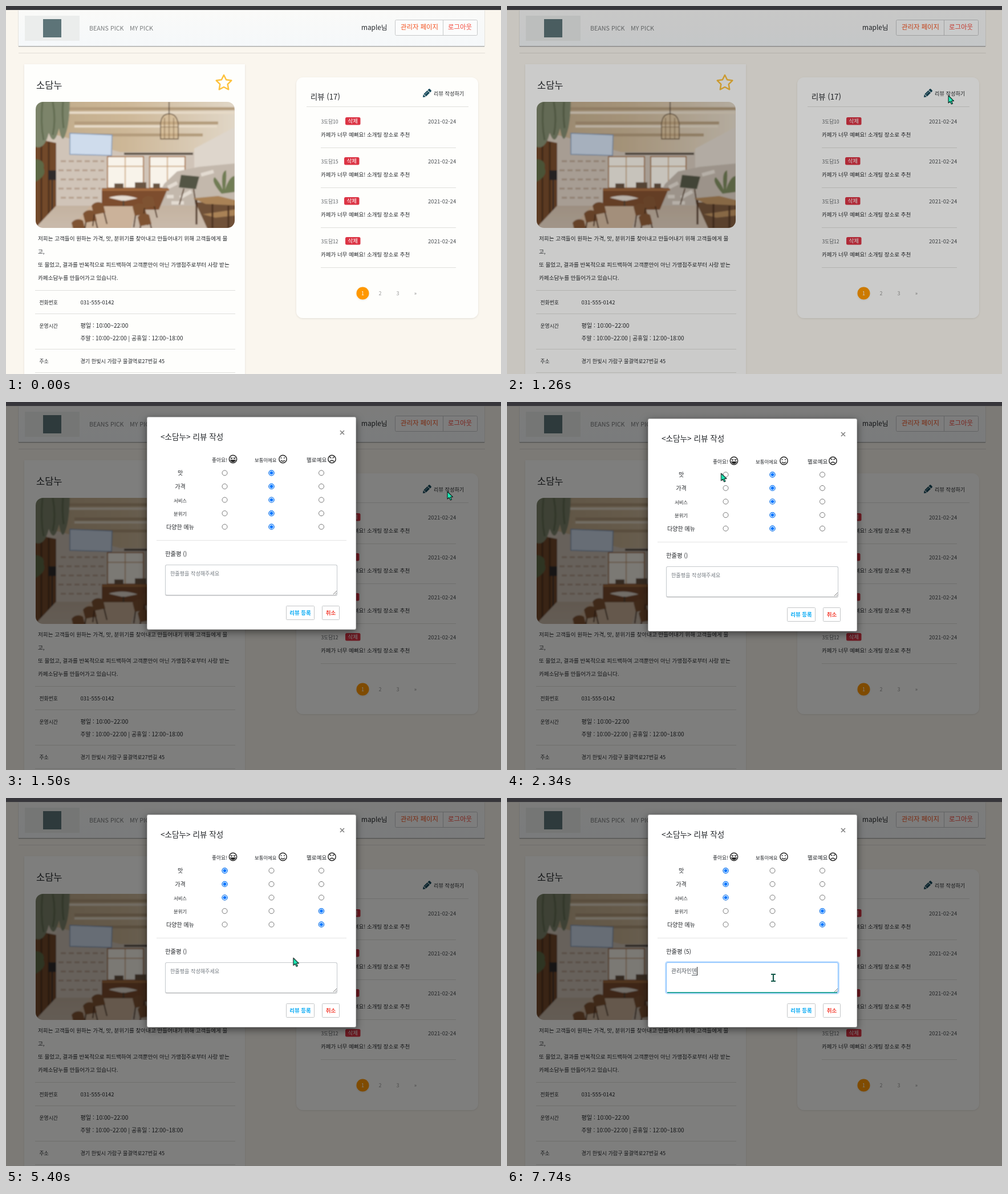
An HTML page that plays this animation: 868x645 px, repeating every 8000 ms.

```html
<!DOCTYPE html>
<html lang="ko">
<head>
<meta charset="utf-8">
<title>리뷰 작성</title>
<style>
html, body { margin: 0; width: 100%; height: 100%; overflow: hidden; background: #faf6ee; }
body { font-family: "Noto Sans CJK KR", "Noto Sans KR", "Noto Sans CJK", "Noto Sans", sans-serif; }
.stage { position: relative; width: 868px; height: 645px; overflow: hidden; }
.stage svg { position: absolute; left: 0; top: 0; display: block; }
.clip { position: absolute; left: 0; top: 7px; width: 868px; height: 638px; overflow: hidden; }
.shade { position: absolute; inset: 0; background: #000; animation: shade 8s linear infinite; }
.modal { position: absolute; left: 0; top: -7px; width: 868px; height: 645px; animation: drop 8s linear infinite; }
.panel { position: absolute; left: 247px; top: 29px; width: 365px; height: 371px; background: #fff;
  border: 1px solid rgba(0,0,0,.2); border-radius: 3px; box-shadow: 0 4px 14px rgba(0,0,0,.5); }
text { fill: #23262a; }
.mid { text-anchor: middle; }
.rule { stroke: #dfdfdc; }
.field { position: absolute; left: 279px; top: 288px; width: 300px; height: 52px; background: #fff;
  border: 1px solid #c6cace; border-bottom-color: #aeb2b5; border-radius: 3px;
  box-shadow: 0 1px 1px rgba(0,0,0,.12); animation: focus 8s linear infinite; }
.field i { position: absolute; left: 1px; right: 1px; bottom: -1px; height: 2px; background: #26a69a; }
.field i, .caret { animation: after-focus 8s step-end infinite; }
.line { position: absolute; white-space: pre; line-height: 16px; color: #23262a; }
.count { left: 279px; top: 260.5px; font-size: 10.3px; }
.typed { left: 288px; top: 295px; font-size: 9.7px; color: #495057; display: flex; }
.line b { font-weight: 400; }
.line b::before { content: ""; animation: 8s step-end infinite; }
.line .num::before { animation-name: num; }
.line .done::before { animation-name: done; }
.line .comp::before { animation-name: comp; }
.comp { height: 15px; border-bottom: 1px solid transparent; animation: under 8s step-end infinite; }
.caret { width: 1px; height: 15px; margin-top: 1px; background: #222; }
.hint { animation: hint 8s step-end infinite; }
.pick { animation: 8s step-end infinite; }
.cursor { animation: move 8s linear infinite; }
.arrow { animation: arrow 8s step-end infinite; }
.beam { animation: beam 8s step-end infinite; }

@keyframes shade { 0%, 15% { opacity: 0 } 16.9%, to { opacity: .5 } }
@keyframes drop {
  0%, 16.5% { opacity: 0; transform: translateY(-44px) }
  17.25% { opacity: .18; transform: translateY(-30px) }
  18% { opacity: .6; transform: translateY(-12px) }
  18.75% { opacity: 1; transform: translateY(-3px) }
  19.5%, to { opacity: 1; transform: none }
}
@keyframes focus {
  0%, 70.5% { border-color: #c6cace #c6cace #aeb2b5; box-shadow: 0 1px 1px rgba(0,0,0,.12) }
  72%, to { border-color: #80bdff; box-shadow: 0 0 0 2px rgba(0,123,255,.25) }
}
@keyframes after-focus { 0% { opacity: 0 } 71.25%, to { opacity: 1 } }
@keyframes hint { 0% { opacity: 1 } 72%, to { opacity: 0 } }
@keyframes under { 0% { border-color: transparent } 72%, to { border-color: #495057 } }
@keyframes num {
  0% { content: "" } 72% { content: "1" } 81% { content: "2" }
  84% { content: "3" } 87.75% { content: "4" } 90.75%, to { content: "5" }
}
@keyframes done {
  0% { content: "" } 81% { content: "관" } 84% { content: "관리" }
  87.75% { content: "관리자" } 90.75%, to { content: "관리자인" }
}
@keyframes comp {
  0% { content: "" } 72% { content: "ㄱ" } 77.25% { content: "과" } 79.5% { content: "관" }
  81% { content: "ㄹ" } 81.75% { content: "리" } 84% { content: "ㅈ" } 85.5% { content: "자" }
  87.75% { content: "ㅇ" } 89.25% { content: "이" } 90% { content: "인" }
  90.75% { content: "ㄷ" } 91.5% { content: "데" } 96.75%, to { content: "덴" }
}
@keyframes pick0 { 0% { transform: none } 31.5%, to { transform: translateX(-82px) } }
@keyframes pick1 { 0% { transform: none } 36%, to { transform: translateX(-82px) } }
@keyframes pick2 { 0% { transform: none } 40.5%, to { transform: translateX(-82px) } }
@keyframes pick3 { 0% { transform: none } 56.25%, to { transform: translateX(87.5px) } }
@keyframes pick4 { 0% { transform: none } 60.75%, to { transform: translateX(87.5px) } }
@keyframes move {
  0%, 1.5% { transform: translate(630px,424px) }
  6% { transform: translate(845px,66px) }
  10.5%, 20% { transform: translate(774px,157px) }
  24.75% { transform: translate(444px,184px) }
  28.5%, 30.75% { transform: translate(375.5px,125px) }
  31.5%, 33% { transform: translate(379px,125px) }
  35.25%, 37% { transform: translate(380px,149px) }
  39.5%, 42% { transform: translate(381px,168px) }
  51.75% { transform: translate(541px,203px) }
  52.5% { transform: translate(552px,215px) }
  55%, 57% { transform: translate(553px,197px) }
  59.5%, 62.25% { transform: translate(553px,218px) }
  69% { transform: translate(490px,298px) }
  71.5%, to { transform: translate(467px,315px) }
}
@keyframes arrow { 0% { opacity: 0 } 1.5% { opacity: 1 } 69%, to { opacity: 0 } }
@keyframes beam { 0% { opacity: 0 } 69%, to { opacity: 1 } }
</style>
</head>
<body>
<div class="stage">
<svg width="868" height="645" viewBox="0 0 868 645">
  <defs>
    <clipPath id="photo"><rect x="52" y="168" width="349" height="221" rx="13"/></clipPath>
    <linearGradient id="ceiling">
      <stop stop-color="#bda888"/><stop offset=".45" stop-color="#cdb797"/><stop offset="1" stop-color="#e2d8c9"/>
    </linearGradient>
    <linearGradient id="floor" x2="0" y2="1">
      <stop stop-color="#c4b3a1"/><stop offset="1" stop-color="#cbbcae"/>
    </linearGradient>
    <linearGradient id="nav" x2="0" y2="1">
      <stop stop-color="#fafaf8"/><stop offset="1" stop-color="#f5f8fa"/>
    </linearGradient>
    <filter id="soft" x="-10%" y="-10%" width="120%" height="130%">
      <feDropShadow dx="0" dy="1" stdDeviation="1.5" flood-opacity=".1"/>
    </filter>
    <filter id="lens"><feGaussianBlur stdDeviation=".8"/></filter>
    <g id="chair">
      <path d="M0 6Q8-4 20 2L24 18L4 22Z" fill="#7f5231"/>
      <path d="M5 21L2 42M22 18L27 38" stroke="#4d3322" stroke-width="2"/>
    </g>
  </defs>
  <rect width="868" height="645" fill="#faf6ee"/>
  <rect width="868" height="7" fill="#37363b"/>

  <path d="M22 7H839V70H22Z" fill="url(#nav)"/>
  <path d="M22 70.500H839" stroke="#adafaf"/>
  <path d="M22 71.500H839" stroke="#d3d1cc"/>
  <path d="M21.500 8V71M839.500 8V71" stroke="#e6e3dd"/>
  <path d="M22 82.500H840" stroke="#e2ded7"/>
  <rect x="33" y="17" width="96" height="44" fill="#ebedec"/>
  <rect x="65" y="23" width="32" height="32" fill="#5d7478"/>
  <g font-size="10.700">
    <text x="146" y="42.500" style="fill:#777a7b">BEANS PICK</text>
    <text x="217" y="42.500" style="fill:#777a7b">MY PICK</text>
  </g>
  <text x="623" y="42" font-size="11.800">maple님</text>
  <rect x="682.500" y="24.500" width="144" height="27" rx="2" fill="#fbfcfc" stroke="#c6c8c9"/>
  <path d="M766.500 24V52" stroke="#c6c8c9"/>
  <g font-size="11.400" font-weight="500">
    <text x="692" y="41" style="fill:#f4511e">관리자 페이지</text>
    <text x="775" y="41" style="fill:#f44336">로그아웃</text>
  </g>

  <rect x="32" y="102" width="387" height="560" fill="#fefefc" filter="url(#soft)"/>
  <text x="53" y="145" font-size="16.500">소담누</text>
  <path d="M382 121L386.100 129.300L395.300 130.600L388.700 137.100L390.200 146.300L382 142L373.800 146.300L375.300 137.100L368.700 130.600L377.900 129.300Z"
    fill="none" stroke="#fdc23e" stroke-width="2.500" stroke-linejoin="round"/>

  <g clip-path="url(#photo)"><g filter="url(#lens)">
    <rect x="40" y="156" width="373" height="245" fill="#d2c6b8"/>
    <path d="M40 156H413V206L330 258H200L40 214Z" fill="url(#ceiling)"/>
    <path d="M100 180H401M120 205H372M150 226H345" stroke="#b39b7c" stroke-width="5"/>
    <path d="M100 187H401M120 211H370" stroke="#e6dac7" stroke-width="4"/>
    <path d="M330 250L413 206V340H330Z" fill="#ded6cc"/>
    <path d="M88 226L200 256H330V350H88Z" fill="#d0c4b8"/>
    <path d="M96 272H172M92 288H176M96 304H174M92 320H166M96 336H164" stroke="#b39e8b" stroke-width="3" stroke-dasharray="9 5"/>
    <path d="M207 259H328" stroke="#51463b" stroke-width="3.500"/>
    <path d="M40 230L88 240V401H40Z" fill="#724829"/>
    <path d="M62 236V389M75 238V389" stroke="#50301d" stroke-width="3"/>
    <path d="M40 156H112Q112 205 104 226Q98 244 93 214Q84 250 75 222Q66 262 40 240Z" fill="#7c846a"/>
    <path d="M64 168Q60 205 66 235M82 168Q88 200 82 226M100 168Q98 190 101 214" fill="none" stroke="#626c51" stroke-width="3"/>
    <path d="M40 268Q70 266 66 284Q74 300 40 314Z" fill="#5d6744"/>
    <path d="M112 223L186 226L185 262L112 260Z" fill="#cfdcec" stroke="#7f97b5" stroke-width="1.500"/>
    <rect x="74" y="288" width="14" height="17" fill="#2f2b29"/>
    <path d="M81 305V380" stroke="#2f2b29" stroke-width="2"/>
    <path d="M178 264H241V319H178ZM252 264H314V319H252Z" fill="#f8f3ea" stroke="#a87343" stroke-width="2"/>
    <path d="M209 264V319M283 264V319M178 281H241M252 281H314" stroke="#c49a6c" stroke-width="1.500"/>
    <path d="M286 168V190" stroke="#4a3e34" stroke-width="1.500"/>
    <path d="M271 233V208Q272 189 286 189Q300 189 302 208V233Z" fill="#d7b989" fill-opacity=".45" stroke="#5f4a34" stroke-width="1.300"/>
    <path d="M278 232V196M286 232V190M294 232V196M271 212H302" stroke="#7a6043"/>
    <path d="M256 358L277 312L300 290L338 282L401 276V389H256Z" fill="#c3b8ac"/>
    <path d="M284 318L300 310M305 336L325 325M342 296L364 290M290 345H312M282 334H294" stroke="#e3dbd1" stroke-width="6"/>
    <path d="M40 401L88 350H413V401Z" fill="url(#floor)"/>
    <path d="M168 319H284L268 357H168Z" fill="#7d4d2d"/>
    <path d="M168 322H286" stroke="#a26b41" stroke-width="4"/>
    <path d="M190 319V311H206V319M226 319V309H246V319M258 319V311H270V319" fill="#6b5542"/>
    <path d="M307 296L339 299L333 321L303 318Z" fill="#535544"/>
    <path d="M312 320L304 348M329 321L333 348" stroke="#58402d" stroke-width="2"/>
    <path d="M378 329Q358 306 366 300Q374 308 380 322Q376 290 386 288Q387 306 384 322Q392 298 401 298V326Z" fill="#717d55"/>
    <path d="M180 336Q204 328 231 337L206 342Z" fill="#e6ddd2"/>
    <path d="M206 341V356" stroke="#5b4838" stroke-width="3"/>
    <path d="M147 351H230L216 401H104Z" fill="#cbb29a"/>
    <use href="#chair" x="115" y="374"/><use href="#chair" x="135" y="358"/>
    <use href="#chair" x="150" y="344"/><use href="#chair" x="222" y="346"/>
    <use href="#chair" x="238" y="333"/><use href="#chair" x="231" y="364"/>
    <path d="M332 344H413V401H358Z" fill="#6f5139"/>
    <path d="M328 337L372 333L413 343V350L350 347Z" fill="#a98257"/>
    <path d="M345 365L413 355V366L367 371Z" fill="#a98257"/>
    <path d="M334 340V383M362 347V389M390 350V389" stroke="#4c3322" stroke-width="3"/>
  </g></g>

  <g font-size="9.600">
    <text x="56" y="411">저희는 고객들이 원하는 가격, 맛, 분위기를 찾아내고 만들어내기 위해 고객들에게 물</text>
    <text x="56" y="433.500">고,</text>
    <text x="56" y="456.500">또 물었고, 결과를 반복적으로 피드백하여 고객뿐만이 아닌 가맹점주로부터 사랑 받는</text>
    <text x="56" y="479.500">카페소담누를 만들어가고 있습니다.</text>
  </g>
  <path class="rule" d="M51 498.500H402M51 539.500H402M51 601.500H402M51 642.500H402"/>
  <g font-size="8.800">
    <text x="58.500" y="523">전화번호</text>
    <text x="58.500" y="564">운영시간</text>
    <text x="58.500" y="626">주소</text>
  </g>
  <text x="130.500" y="523" font-size="9.450">031-555-0142</text>
  <text x="130.500" y="563.500" font-size="10.200">평일 : 10:00~22:00</text>
  <text x="130.500" y="585.500" font-size="9.900">주말 : 10:00~22:00 | 공휴일 : 12:00~18:00</text>
  <text x="130.500" y="626" font-size="9.100">경기 한빛시 가람구 물결역로27번길 45</text>

  <rect x="509" y="125" width="319" height="422" rx="12" fill="#fefefc" filter="url(#soft)"/>
  <text x="534" y="164" font-size="13.300">리뷰 (17)</text>
  <g transform="translate(731 160) rotate(-45)" fill="#16495a">
    <path d="M0 0L4-3V3ZM5-3H14V3H5ZM15-3H17.500Q19-3 19-1.500V1.500Q19 3 17.500 3H15Z"/>
    <path d="M6-.800H13" stroke="#cfe0e4" stroke-width=".8"/>
  </g>
  <text x="750" y="157" font-size="9.200">리뷰 작성하기</text>
  <path class="rule" d="M527 176.500H811"/>
  <g id="reviews"></g>
  <circle cx="625.500" cy="503.500" r="11" fill="#ff9800" filter="url(#soft)"/>
  <g class="mid" font-size="9">
    <text x="625.500" y="506.500" style="fill:#fff">1</text>
    <text x="656" y="506.500" style="fill:#999">2</text>
    <text x="687" y="506.500" style="fill:#999">3</text>
    <text x="718" y="506.500" style="fill:#888">»</text>
  </g>
</svg>

<div class="clip">
  <div class="shade"></div>
  <div class="modal">
    <div class="panel"></div>
    <div class="field"><i></i></div>
    <svg width="868" height="645" viewBox="0 0 868 645">
      <text x="271" y="69" font-size="13.600">&lt;소담누&gt; 리뷰 작성</text>
      <path d="M586 53L593 60M593 53L586 60" stroke="#848484" stroke-width="1.700"/>
      <text x="361" y="107.500" font-size="8.700">좋아요!</text>
      <text x="436" y="107.500" font-size="8.400">보통이에요</text>
      <text x="527" y="107.500" font-size="9.600">별로예요</text>
      <g fill="none" stroke="#222" stroke-width="1.400">
        <g id="faces"></g>
        <path d="M394 105Q398 110.500 402 105Z" fill="#222"/>
        <path d="M393.500 100.500L395.500 102L397 100.500M399 100.500L400.500 102L402.500 100.500"/>
        <path d="M482 105Q485.500 108.500 489 105M482.500 100V102M488 100V102"/>
        <path d="M568 107Q571.500 103.500 575 107M567.500 99L570.500 101.500M575.500 99L572.500 101.500"/>
      </g>
      <g id="rows"></g>
      <path d="M264 245.500H597" stroke="#e4e4e4"/>
      <text class="hint" x="288" y="307" font-size="9.100" style="fill:#737a80">한줄평을 작성해주세요</text>
      <path d="M574 340L580 334M577.500 340L580 337.500" stroke="#777"/>
      <g fill="#fff" stroke="#c4c6c8">
        <rect x="491.500" y="360.500" width="49" height="24" rx="1"/>
        <rect x="554.500" y="360.500" width="30" height="24" rx="1"/>
      </g>
      <g class="mid" font-size="9.500" font-weight="700">
        <text x="516" y="376" style="fill:#03a9f4">리뷰 등록</text>
        <text x="569.500" y="376" style="fill:#f44336">취소</text>
      </g>
    </svg>
    <div class="line count">한줄평 (<b class="num"></b>)</div>
    <div class="line typed"><b class="done"></b><b class="comp"></b><span class="caret"></span></div>
  </div>
</div>

<svg width="868" height="645" viewBox="0 0 868 645">
  <g class="cursor">
    <path class="arrow" d="M0 0V13L3 10.300L5.300 15L7.500 14L5.300 9.500H9.500Z" fill="#1de9b6" stroke="#10201c" stroke-width="1.100" stroke-linejoin="round"/>
    <path class="beam" d="M-4-6H4M-4 6H4M0-6V6" fill="none" stroke="#15594b" stroke-width="2.200"/>
  </g>
</svg>
</div>

<script>
const fill = (id, items, draw) => {
  document.getElementById(id).innerHTML = items.map(draw).join("");
};

fill("reviews", [[10, 595], [15, 593], [13, 593], [12, 595]], ([id, x], i) => `
  <g transform="translate(0 ${i * 70})">
    <text x="552.5" y="206" font-size="8.600" style="fill:#5c6064">3도담${id}</text>
    <rect x="${x}" y="195" width="26.500" height="13.500" rx="2.500" fill="#dc3545"/>
    <text class="mid" x="${x + 13.2}" y="205.300" font-size="9.500" style="fill:#fff">삭제</text>
    <text x="740" y="206" font-size="9.600" style="fill:#4a4e52">2021-02-24</text>
    <text x="552" y="229" font-size="9.500">카페가 너무 예뻐요! 소개팅 장소로 추천</text>
    <path class="rule" d="M552 248.500H789"/>
  </g>`);

fill("faces", [398, 485.5, 571.5], x => `<circle cx="${x}" cy="103" r="6.700"/>`);

const columns = [383.5, 465.5, 553];
fill("rows", ["맛", "가격", "서비스", "분위기", "다양한 메뉴"], (label, i) => {
  const y = 127.3 + i * 23.6;
  const rings = columns.map(x => `<circle cx="${x}" cy="${y}" r="4.500" fill="#fff" stroke="#767676"/>`);
  return `<text class="mid" x="305.5" y="${y + 4}" font-size="${i < 2 || i > 3 ? 10 : 8.4}">${label}</text>
    ${rings.join("")}
    <g class="pick" style="animation-name:pick${i}">
      <circle cx="${columns[1]}" cy="${y}" r="4.500" fill="#fff" stroke="#0075ff" stroke-width="1.200"/>
      <circle cx="${columns[1]}" cy="${y}" r="2.800" fill="#0075ff"/>
    </g>`;
});
</script>
</body>
</html>
```
